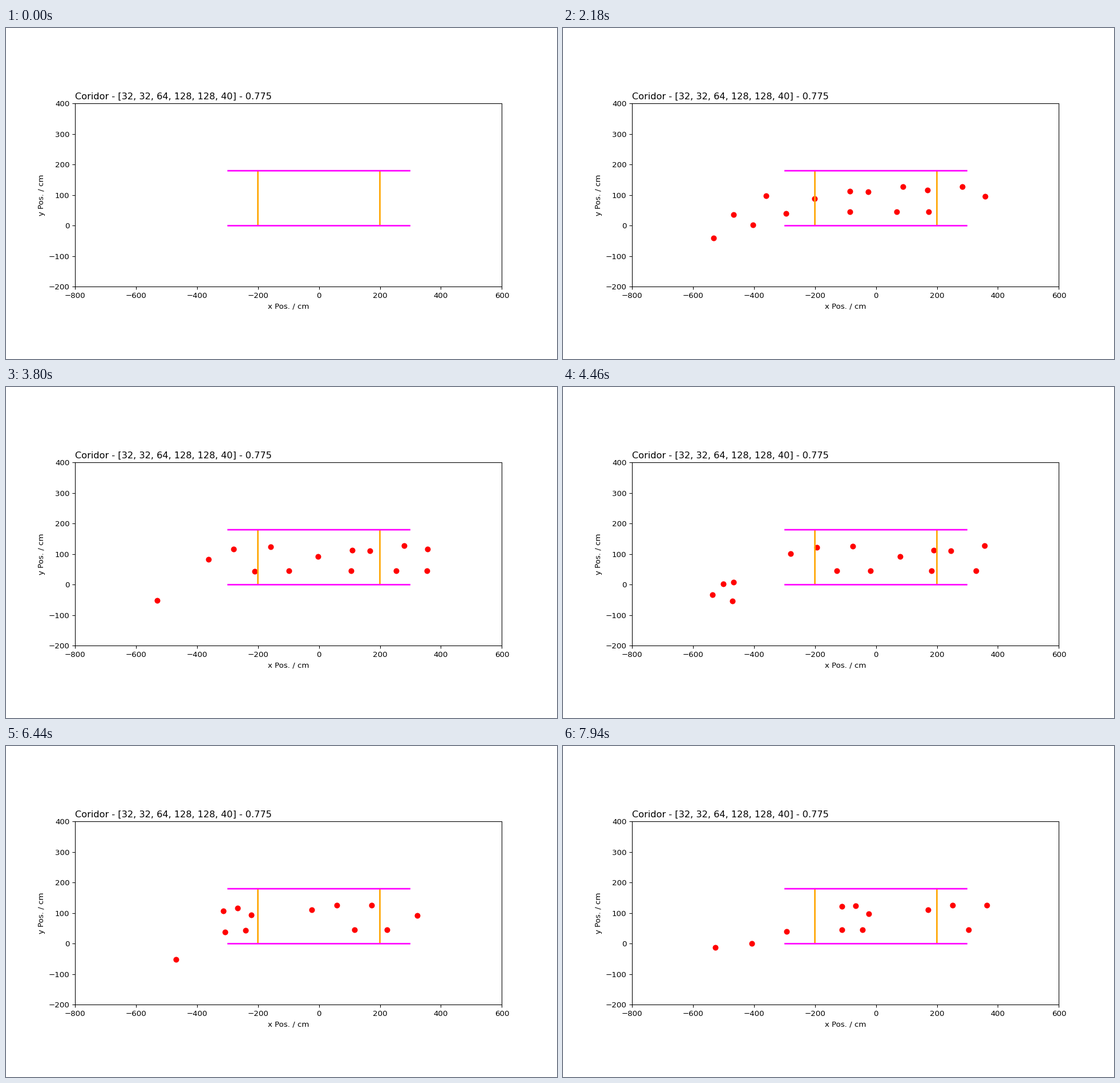
Recreate the animation shown at these times as a matplotlib script. Size 966x580 px, loop 8 s.

```python
import numpy as np
import matplotlib.pyplot as plt
from matplotlib.animation import FuncAnimation

W, H, DPI = 966, 580, 100
SCALE = 0.966            # all type and strokes are a little under default size
TICK = 20                # ms per drawn frame
HOLD, STEP = 500, 60     # ms of empty corridor, then ms per walking step
LOOP = 8000
MID, EXIT = 500, 752     # reference and last x, in stage pixels

for key in ("font.size", "axes.linewidth", "axes.titlepad", "axes.labelpad",
            "xtick.major.size", "xtick.major.width", "xtick.major.pad",
            "ytick.major.size", "ytick.major.width", "ytick.major.pad"):
    plt.rcParams[key] *= SCALE

# Step at which each walker passes MID, and the height of the upper lanes.
UPPER = {-48: 294, -38: 295, -26: 278, -8.5: 284, 3.5: 278, 20: 287,
         28.3: 286, 44: 297, 65: 279, 80.5: 279, 91.3: 287, 116.5: 294,
         122: 280, 127.6: 281, 181: 275}
LOWER = (-51, -10, 6, 28.3, 57, 72, 119, 127.6, 150, 164.5)
LOWER_LANE = 322


class Walker:
    """Climbs from the lower left into a lane, at constant speed on its path."""

    def __init__(self, mid_step, lane, start, drop, width, speed):
        self.x = np.arange(start, EXIT + 1.0)
        self.y = lane + drop * np.exp(-((self.x - start) / width) ** 1.3)
        steps = np.hypot(np.diff(self.x), np.diff(self.y))
        self.s = np.concatenate([[0], np.cumsum(steps)])
        self.s -= self.s[MID - start]
        self.mid_step = mid_step
        self.speed = speed + 0.0045 * mid_step   # later walkers are faster

    def at(self, n):
        s = self.speed * (n - self.mid_step)
        if self.s[0] <= s <= self.s[-1]:
            return np.interp(s, self.s, self.x), np.interp(s, self.s, self.y)
        return None


walkers = [Walker(t, lane, 258, 85, 64, 3.75) for t, lane in UPPER.items()]
walkers += [Walker(t, LOWER_LANE, 292, 56, 44, 3.65) for t in LOWER]

fig, ax = plt.subplots(figsize=(W / DPI, H / DPI), dpi=DPI)
ax.set_aspect("equal")
ax.set_xlim(-800, 600)
ax.set_ylim(-200, 400)
ax.set_xlabel("x Pos. / cm")
ax.set_ylabel("y Pos. / cm")
ax.set_title("Coridor - [32, 32, 64, 128, 128, 40] - 0.775", loc="left")

wall = dict(lw=2 * SCALE, solid_capstyle="butt", snap=False)
for x in (-200, 200):
    ax.plot([x, x], [0, 180], color="orange", **wall)
for y in (0, 180):
    ax.plot([-300, 300], [y, y], color="magenta", **wall)
dots = ax.scatter([], [], s=(6 * SCALE) ** 2, linewidths=1.5 * SCALE,
                  color="red", zorder=1)

ax.apply_aspect()
to_data = ax.transData.inverted().frozen()


def update(i):
    ms = i * TICK
    spots = []
    if ms >= HOLD:
        n = 1 + (ms - HOLD) // STEP
        spots = [p for p in (w.at(n) for w in walkers) if p is not None]
    if spots:
        dots.set_offsets(to_data.transform([(x, H - y) for x, y in spots]))
    else:
        dots.set_offsets(np.empty((0, 2)))
    return (dots,)


anim = FuncAnimation(fig, update, frames=LOOP // TICK, interval=TICK,
                     init_func=lambda: update(0), repeat=True,
                     repeat_delay=0, blit=True)
plt.show()
```
